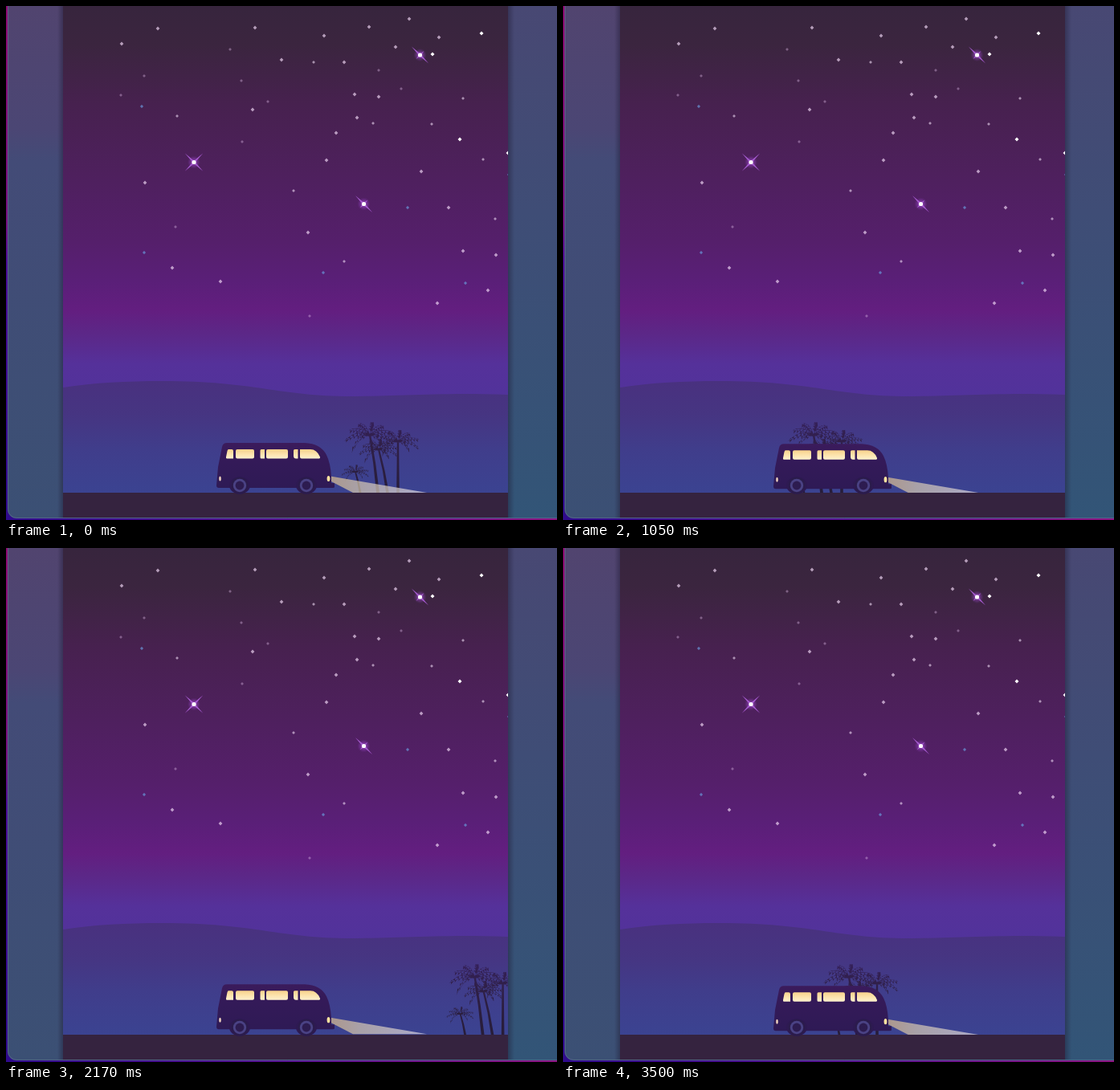
Animation of 686x640 px, one loop 3.57 s. Source, as an HTML page with a canvas:

```html
<!DOCTYPE html>
<html lang="en">
<head>
<meta charset="utf-8">
<title>Night drive</title>
<style>
html, body { margin: 0; width: 100%; height: 100%; overflow: hidden; background: #35233f; }
canvas { display: block; }
</style>
</head>
<body>
<canvas id="stage" width="686" height="640"></canvas>
<script>
const ctx = document.getElementById('stage').getContext('2d');
const LOOP = 3570, TICK = 70;
const SCENE = { left: 71, right: 625, bottom: 637, ground: 606 };
const STRIP = 1467, SPEED = 166.4, GROUPS = [0, 888];

const STARS = [
  { color: '#fff', r: 1.9, at: [592,34, 531,60, 565,166, 625,183] },
  { color: 'rgba(240,215,245,.68)', r: 1.8, at: [
    144,47, 189,28, 310,27, 396,37, 343,67, 502,16, 539,39, 485,51, 452,26, 421,70,
    434,110, 464,113, 437,139, 411,158, 307,129, 399,192, 173,220, 517,206, 551,251,
    376,282, 207,326, 267,343, 569,305, 610,310, 537,370, 600,354] },
  { color: 'rgba(240,220,245,.6)', r: 1.4, at: [569,115, 594,191, 213,137, 530,147, 383,70, 457,146, 358,230, 421,318, 609,265] },
  { color: 'rgba(225,190,235,.4)', r: 1.4, at: [279,54, 293,93, 172,87, 143,111, 326,119, 464,80, 492,103, 294,169, 211,275, 378,386] },
  { color: 'rgba(105,150,215,.7)', r: 1.6, at: [169,125, 172,307, 395,332, 500,251, 572,345, 626,210] }
];

function gradient(x0, y0, x1, y1, stops) {
  const g = ctx.createLinearGradient(x0, y0, x1, y1);
  for (const [at, color] of stops) g.addColorStop(at, color);
  return g;
}
const vertical = (y0, y1, stops) => gradient(0, y0, 0, y1, stops);

const paint = {
  frame: vertical(0, 640, [[0, '#8d0a70'], [.42, '#75107f'], [.5, '#4a0c96'], [1, '#2f0a8c']]),
  edge: gradient(0, 0, 686, 0, [[0, '#2f0a8c'], [.55, '#5a1590'], [1, '#8a1480']]),
  leftPanel: vertical(0, 640, [[0, '#51446f'], [.24, '#4b4674'], [.3, '#434b77'], [1, '#3b5074']]),
  rightPanel: vertical(0, 640, [[0, '#484873'], [.4, '#3f4d76'], [1, '#325577']]),
  sky: vertical(0, 490, [[0, '#37253d'], [.1, '#3b253f'], [.25, '#47214f'], [.45, '#4f205f'], [.6, '#551f6b'],
    [.7, '#5a1f78'], [.775, '#631e80'], [.83, '#5c2787'], [.91, '#55319a'], [1, '#51339b']]),
  land: vertical(468, 606, [[0, '#49317f'], [.3, '#463582'], [.6, '#403d8b'], [1, '#3b4391']]),
  palm: vertical(516, 606, [[0, '#35205a'], [.35, '#2f1f46'], [1, '#271d39']]),
  van: vertical(543, 602, [[0, '#3c1b5c'], [.25, '#351a59'], [1, '#2e1a55']]),
  window: vertical(551, 565, [[0, '#f7cf85'], [.5, '#fce3ad'], [1, '#fff5d6']]),
  beam: gradient(404, 0, 523, 0, [[0, 'rgba(240,205,140,.62)'], [.3, 'rgba(225,210,180,.66)'], [1, 'rgba(215,210,225,.72)']])
};

function rect(x, y, w, h, fill) {
  ctx.fillStyle = fill;
  ctx.fillRect(x, y, w, h);
}
function shape(path, fill) {
  ctx.fillStyle = fill;
  ctx.fill(path);
}
function ellipse(x, y, rx, ry, fill) {
  ctx.fillStyle = fill;
  ctx.beginPath();
  ctx.ellipse(x, y, rx, ry, 0, 0, 7);
  ctx.fill();
}

const hills = new Path2D('M71 475C110 469 150 467 195 467C310 467 340 486 430 486C490 486 540 481 625 484V606H71Z');
const vanBody = new Path2D('M275 544H372Q392 545 399 559Q404 569 405 586V594H409V599Q409 600 407 600H265Q262 600 262 597L264 574L269 549Q270 544 275 544Z');
const windows = new Path2D('M277 552H281Q283 552 283 554V563.5H275Q273.500 563.500 274 561.500L275.500 554Q276 552 277 552Z' +
  'M288 552H307Q309 552 309 554V561.500Q309 563.500 307 563.500H288Q286 563.500 286 561.500V554Q286 552 288 552Z' +
  'M318 552H322V563.500H318Q316.500 563.500 316.500 562V553.500Q316.500 552 318 552Z' +
  'M326 552H349Q351 552 351 554V561.500Q351 563.500 349 563.500H326Q324 563.500 324 561.500V554Q324 552 326 552Z' +
  'M359.500 552H363.500V563.500H361Q358 563.500 358 560V553.500Q358 552 359.500 552Z' +
  'M366 552H379Q387 552 391 561.500Q391.500 563.500 389 563.500H368Q366 563.500 366 561.500Z');
const beam = new Path2D('M404 585.500L524 606H432L404 591.500Z');

function star(x, y, r) {
  ctx.beginPath();
  ctx.moveTo(x, y - r - .6);
  ctx.quadraticCurveTo(x + r * .6, y - r * .6, x + r + .6, y);
  ctx.quadraticCurveTo(x + r * .6, y + r * .6, x, y + r + .6);
  ctx.quadraticCurveTo(x - r * .6, y + r * .6, x - r - .6, y);
  ctx.quadraticCurveTo(x - r * .6, y - r * .6, x, y - r - .6);
  ctx.fill();
}

function sparkle(x, y, down, up) {
  const glow = ctx.createRadialGradient(x, y, 0, x, y, 8);
  glow.addColorStop(0, 'rgba(190,90,235,.75)');
  glow.addColorStop(1, 'rgba(150,60,210,0)');
  ellipse(x, y, 8, 8, glow);
  ctx.fillStyle = '#a65bd0';
  for (const [angle, length] of [[Math.PI / 4, down], [-Math.PI / 4, up]]) {
    ctx.save();
    ctx.translate(x, y);
    ctx.rotate(angle);
    ctx.beginPath();
    ctx.moveTo(-length, 0);
    ctx.lineTo(0, -1.3);
    ctx.lineTo(length, 0);
    ctx.lineTo(0, 1.3);
    ctx.fill();
    ctx.restore();
  }
  ellipse(x, y, 2.6, 2.6, '#fff');
}

// A drooping leaf: tapered blade with a fringe of hanging leaflets.
function frond(path, x, y, dx, dy, size) {
  const cx = x + dx * .5, cy = y + Math.min(dy, 0) * .75 - 7 * size;
  const tx = x + dx, ty = y + dy, side = Math.sign(dx);
  path.moveTo(x, y - size);
  path.quadraticCurveTo(cx, cy - size, tx, ty);
  path.quadraticCurveTo(cx - side * size, cy + 5 * size, x, y + 2 * size);
  path.closePath();
  for (let s = .25; s < 1; s += .15) {
    const a = (1 - s) * (1 - s), b = 2 * s * (1 - s), c = s * s;
    const px = a * x + b * cx + c * tx, py = a * y + b * cy + c * ty;
    path.moveTo(px - 2 * side * size, py);
    path.lineTo(px + side * 2.5 * size, py + (8 - 3 * s) * size);
    path.lineTo(px + 2 * side * size, py);
    path.closePath();
  }
}

function palm(x, y, foot, size, reach) {
  const path = new Path2D(), w = 1.2 + 1.2 * size, bend = x * .35 + foot * .65;
  path.moveTo(x - w * .5, y);
  path.quadraticCurveTo(bend - w * .6, (y + 606) / 2, foot - w * .8, 606);
  path.lineTo(foot + w * .8, 606);
  path.quadraticCurveTo(bend + w * .6, (y + 606) / 2, x + w * .5, y);
  path.closePath();
  const tips = [[-1, .25], [-.82, -.18], [-.45, -.42], [.1, -.48], [.55, -.34], [.95, -.08], [.95, .36], [.5, .5], [-.72, .72]];
  for (const [u, v] of tips) frond(path, x, y, u * reach, v * reach, size);
  return path;
}

const palms = [
  palm(453, 534, 463, 1, 32),
  palm(464, 552, 475, .85, 25),
  palm(488, 542, 488, .9, 28),
  palm(435, 580, 441, .5, 18)
];

function drawPanels() {
  rect(0, 0, 686, 640, paint.frame);
  rect(8, 634, 678, 6, paint.edge);
  ctx.save();
  ctx.beginPath();
  ctx.roundRect(2, -20, 720, 658, 11);
  ctx.clip();
  rect(0, 0, 350, 640, paint.leftPanel);
  rect(350, 0, 336, 640, paint.rightPanel);
  ctx.restore();
  ctx.strokeStyle = 'rgba(130,140,180,.35)';
  ctx.lineWidth = 1;
  ctx.beginPath();
  ctx.roundRect(2.5, -20, 720, 657.5, 11);
  ctx.stroke();
  const { left, right, bottom } = SCENE;
  const shade = [[0, 'rgba(30,25,50,.42)'], [1, 'rgba(30,25,50,0)']];
  rect(left - 7, 0, 7, bottom, gradient(left, 0, left - 7, 0, shade));
  rect(right, 0, 8, bottom, gradient(right, 0, right + 8, 0, shade));
}

function drawSky() {
  const { left, right, bottom, ground } = SCENE;
  rect(left, 0, right - left, bottom, paint.sky);
  for (const { color, r, at } of STARS) {
    ctx.fillStyle = color;
    for (let i = 0; i < at.length; i += 2) star(at[i], at[i + 1], r);
  }
  sparkle(234, 194.5, 16, 16);
  sparkle(445.500, 246.500, 15, 7);
  sparkle(515.500, 61, 15, 7);
  shape(hills, paint.land);
  rect(left, ground, right - left, bottom - ground, '#35233f');
}

function drawPalms(step) {
  for (const start of GROUPS) {
    const travelled = start - SPEED * step + 560;
    const x = ((travelled % STRIP) + STRIP) % STRIP - 560;
    ctx.save();
    ctx.translate(x, 0);
    for (const p of palms) shape(p, paint.palm);
    ctx.restore();
  }
}

function drawVan(step) {
  const bob = 1.2 * Math.sin(step * 2 * Math.PI / 11.8);
  ctx.save();
  ctx.beginPath();
  ctx.rect(SCENE.left, 0, SCENE.right - SCENE.left, SCENE.ground);
  ctx.clip();
  ctx.translate(0, bob);
  shape(beam, paint.beam);
  shape(vanBody, paint.van);
  shape(windows, paint.window);
  ellipse(401.500, 588.500, 1.9, 3.6, '#ffe3a0');
  ellipse(266.500, 588.500, 1.3, 3, '#f3d6c0');
  ctx.restore();
  for (const x of [291, 374]) {
    ellipse(x, 597, 13, 10.500, '#2e1a52');
    ellipse(x, 597, 10.500, 10.500, '#2b1c4c');
    ellipse(x, 597, 8.2, 8.2, '#4a4284');
    ellipse(x, 597, 5.4, 5.4, '#2d1c50');
  }
}

function draw() {
  const step = Math.floor(performance.now() % LOOP / TICK);
  drawPanels();
  ctx.save();
  ctx.beginPath();
  ctx.rect(SCENE.left, 0, SCENE.right - SCENE.left, SCENE.bottom);
  ctx.clip();
  drawSky();
  drawPalms(step);
  drawVan(step);
  ctx.restore();
  requestAnimationFrame(draw);
}
draw();
</script>
</body>
</html>
```
